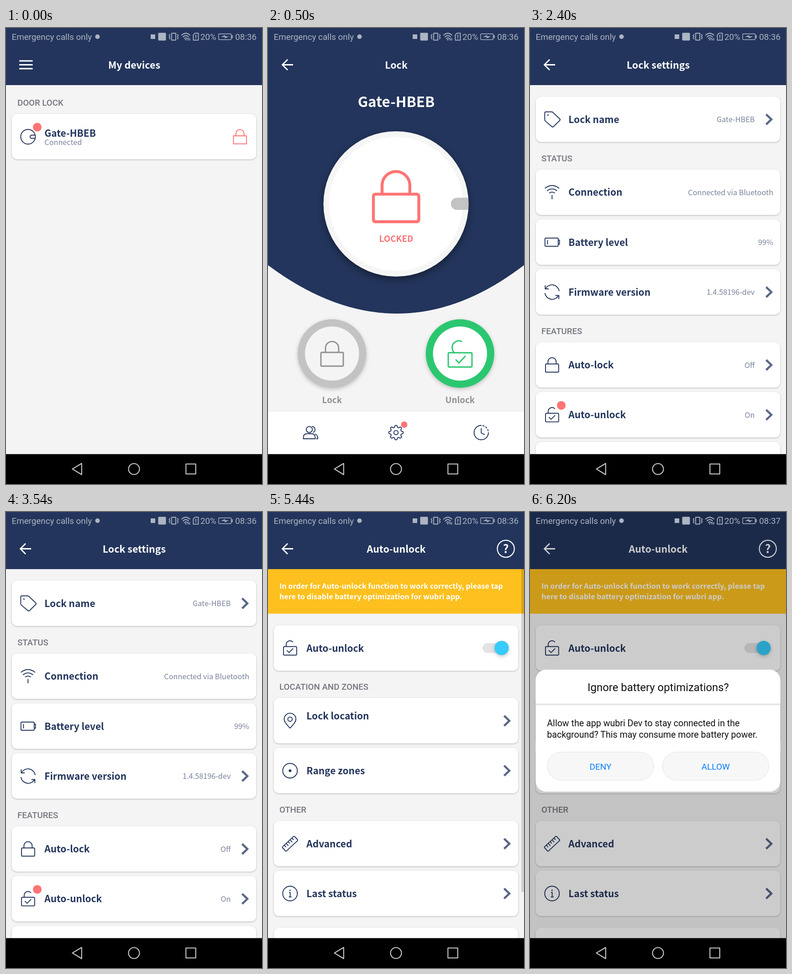
Write an HTML page that moves like this. It is 561 px wide and 998 px high and loops after 8 s.

```html
<!DOCTYPE html>
<html lang="en">
<head>
<meta charset="utf-8">
<title>Lock settings walkthrough</title>
<style>
  html, body { margin: 0; width: 100%; height: 100%; overflow: hidden; background: #f4f4f4; }
  svg { display: block; width: 100vw; height: 100vh; }
  text { font-family: "Noto Sans CJK SC", "Noto Sans CJK JP", "Noto Sans", sans-serif; font-weight: 700; fill: #23355c; }
  .rb { font-family: Roboto, sans-serif; font-weight: 400; }
  .title { font-size: 21.4px; fill: #fff; }
  .item { font-size: 20.9px; }
  .value { font-size: 16.25px; font-weight: 400; fill: #7a839d; }
  .section { font-size: 18.7px; font-weight: 500; fill: #757780; }
  .banner { font-size: 16.15px; fill: #fff; }
  .caption { font-size: 18.7px; fill: #919191; }
  .status { font-size: 18.8px; fill: #adb4c2; }
  .line { fill: none; stroke: #23355c; stroke-width: 1.9; stroke-linecap: round; stroke-linejoin: round; }
  .card { fill: #fff; filter: drop-shadow(0 1.3px 1.6px rgba(0,0,0,.27)); }
  .lift { filter: drop-shadow(0 3px 4px rgba(0,0,0,.22)); }
  .lift-big { filter: drop-shadow(0 6px 8px rgba(0,0,0,.4)); }

  .show { visibility: hidden; animation: 8s step-end infinite; }
  #devices { animation-name: devices; }
  #lock { animation-name: lock; }
  #settings { animation-name: settings; }
  #unlock { animation-name: unlock; }
  #scroll { animation-name: scroll; }
  #dialog, #late { animation-name: dialog; }
  #early { animation-name: early; }
  @keyframes devices { 0% { visibility: visible } 6.25%, 100% { visibility: hidden } }
  @keyframes lock { 0% { visibility: hidden } 6.25% { visibility: visible } 30%, 100% { visibility: hidden } }
  @keyframes settings { 0% { visibility: hidden } 30% { visibility: visible } 53.75%, 100% { visibility: hidden } }
  @keyframes unlock { 0% { visibility: hidden } 53.75%, 100% { visibility: visible } }
  @keyframes scroll { 0% { visibility: hidden } 53.75% { visibility: visible } 77.5%, 100% { visibility: hidden } }
  @keyframes dialog { 0% { visibility: hidden } 77.5%, 100% { visibility: visible } }
  @keyframes early { 0% { visibility: visible } 77.5%, 100% { visibility: hidden } }
</style>
</head>
<body>
<svg id="stage" viewBox="0 0 561 998" preserveAspectRatio="none"></svg>
<script>
const NAVY = '#23355c', RED = '#ff7474', GREEN = '#2bc770', GREY = '#c3c3c3';
const DEVICE = 'Gate-HBEB', APP = 'wubri';

const text = (x, y, cls, str, attrs = '') => `<text x="${x}" y="${y}" class="${cls}" ${attrs}>${str}</text>`;
const mid = 'text-anchor="middle"', end = 'text-anchor="end"';
const rect = (x, y, w, h, fill, r = 0, attrs = '') =>
  `<rect x="${x}" y="${y}" width="${w}" height="${h}" rx="${r}" fill="${fill}" ${attrs}/>`;
const circle = (x, y, r, fill, attrs = '') => `<circle cx="${x}" cy="${y}" r="${r}" fill="${fill}" ${attrs}/>`;
const line = (d, style = '') => `<path class="line" d="${d}" style="${style}"/>`;
const at = (x, y, body) => `<g transform="translate(${x} ${y})">${body}</g>`;
const screen = (id, body) => `<g id="${id}" class="show">${body}</g>`;
const dot = (x, y, r) => circle(x, y, r, RED);
const ring = r => circle(0, 0, r, 'none', 'class="line"');
const box = (x, y, w, h, r) => rect(x, y, w, h, 'none', r, 'class="line"');

// Row icons, drawn around their own centre
const icons = {
  knob: ring(16) + line('M15.6 -3.5 H8 a3.5 3.5 0 0 0 0 7 H15.6'),
  tag: line('M-13.5 -16.5 H-1 q1.5 0 2.6 1 L17 -1 q1.5 1.6 0 3.2 L3 16 q-1.6 1.5 -3.3 0 L-15 3.4 q-1 -1 -1 -2.5 V-14 q0 -2.5 2.5 -2.5 Z') +
    circle(-9, -9.5, 1.5, NAVY),
  wifi: line('M-15 -9 Q0 -20.5 15 -9 M-10.5 -3.5 Q0 -11.5 10.5 -3.5 M-5.5 1.5 Q0 -2.5 5.5 1.5 M0 6.5 V14.5'),
  battery: box(-15.5, -9, 29, 18, 2) + line('M13.5 -4.5 H16.3 V4.5 H13.5 M-10 -4 V4'),
  refresh: line('M-14.5 -7 A16 16 0 0 1 15.5 -3 M14.5 7 A16 16 0 0 1 -15.5 3 M-15 -14 V-7 H-8 M15 14.5 V7.5 H8'),
  lock: box(-14.3, -2.3, 28.8, 18, 2) + line('M-9 -2.3 V-7 a9 9 0 0 1 18 0 V-2.3'),
  unlock: box(-14.3, -3.3, 28.8, 18.8, 2) + line('M-8.5 -3.3 V-7.5 a8.5 8.5 0 0 1 14.5 -6 M-6.5 5.5 l4.3 4.3 L6.3 1.5'),
  pin: line('M0 16 C-7.5 8 -12.8 2.5 -12.8 -3.8 a12.8 12.8 0 0 1 25.6 0 C12.8 2.5 7.5 8 0 16 Z') +
    circle(0, -3.6, 4.8, 'none', 'class="line"'),
  target: ring(16) + circle(0, 0, 3, NAVY),
  ruler: `<g transform="rotate(-43)">${box(-18, -6.3, 36, 12.6, 1.5)}${line('M-11.5 -6 v4.5 M-5.8 -6 v6 M0 -6 v4.5 M5.8 -6 v6 M11.5 -6 v4.5')}</g>`,
  info: ring(16) + line('M-1.5 -2.5 H0.3 V7.5 M-2 7.5 H2.6') + circle(0, -7, 1.5, NAVY)
};

const card = y => rect(12.5, y, 536, 99.6, '#fff', 12, 'class="card"');
const chevron = y => `<path d="M517.5 ${y - 11} L529 ${y} L517.5 ${y + 11}" fill="none" stroke="#5a6785" stroke-width="4.5"/>`;
const section = (y, str) => text(25, y, 'section rb', str);

function row(y, icon, name, { value, arrow, nameY = 57.8, iconY = 50 } = {}) {
  return card(y) + at(48.3, y + iconY, icons[icon]) + text(84.3, y + nameY, 'item', name) +
    (value ? text(arrow ? 492.5 : 533, y + 56, 'value', value, end) : '') +
    (arrow ? chevron(y + 50) : '');
}

const white = 'stroke:#fff;stroke-width:2.8;stroke-linecap:butt;stroke-linejoin:miter';
const back = line('M55 80.5 H32 M43 69 L31.5 80.5 L43 92', white);
const header = (title, left) => rect(0, 0, 561, 125, NAVY) + left + text(281, 89.2, 'title', title, mid);

const devices = header('My devices', line('M29 72 H58.5 M29 80.5 H58.5 M29 89 H58.5', white)) +
  section(170, 'DOOR LOCK') +
  row(188, 'knob', DEVICE, { nameY: 49.8 }) + text(84.3, 256, 'value', 'Connected') + dot(68.5, 217, 9.5) +
  line('M498.5 236 H527 V253.5 H498.5 Z M503.8 236 V231 a8.9 8.9 0 0 1 17.8 0 V236', `stroke:${RED}`);

function gear() {
  let d = '';
  for (let i = 0; i < 160; i++) {
    const a = i / 160 * Math.PI * 2, r = 13.8 + 2 * Math.tanh(2.2 * Math.cos(8 * a));
    d += `${i ? 'L' : 'M'}${(r * Math.cos(a)).toFixed(2)} ${(r * Math.sin(a)).toFixed(2)}`;
  }
  return line(d + 'Z') + ring(4.6);
}
const people = circle(-2.5, -6.7, 6.7, 'none', 'class="line"') +
  line('M-15.5 13.5 V11 q0 -8.5 8 -8.5 H2.5 q8 0 8 8.5 V13.5 Z M4 -13.3 a6.7 6.7 0 0 1 2.5 12.6 M11 3.5 q5 2.2 5 8 V13.5 H13.5');
const clock = line('M0 -15.7 A15.7 15.7 0 1 0 15.7 0 M0 -9 V1 L7 4.2') +
  line('M3.5 -15.3 A15.7 15.7 0 0 1 15.5 -2.5', 'stroke-dasharray:3 4');

const pad = (x, color, inner, label) =>
  circle(x, 712.5, 75, color, 'class="lift"') + circle(x, 712.5, 59.3, inner) + text(x, 821, 'caption', label, mid);

const lock = header('Lock', '') +
  `<path d="M0 0 H561 V519 Q284 731 0 519 Z" fill="${NAVY}"/>` + back +
  text(281, 89.2, 'title', 'Lock', mid) +
  text(281, 172.5, 'title', DEVICE, mid + ' style="font-size:31.3px"') +
  circle(280.5, 385, 159, '#f6f6f6', 'class="lift-big"') + circle(280.5, 385, 146.5, '#fff') +
  `<path d="M439.2 371.5 H414 a13.2 13.2 0 0 0 0 26.5 H439.2 Z" fill="${GREY}"/>` +
  line('M236 363.6 H325.5 q5 0 5 5 V419 q0 5 -5 5 H236 q-5 0 -5 -5 V368.6 q0 -5 5 -5 Z M250 363 V344.5 a30.4 30.4 0 0 1 60.8 0 V363', `stroke:${RED};stroke-width:6.4`) +
  text(281, 468, 'caption', 'LOCKED', mid + ` style="fill:${RED};font-size:18.8px"`) +
  pad(140.3, GREY, '#f4f4f4', 'Lock') + pad(420.8, GREEN, '#fff', 'Unlock') +
  line('M118 710 H163 q2 0 2 2 V738 q0 2 -2 2 H118 q-2 0 -2 -2 V712 q0 -2 2 -2 Z M126 710 V700.5 a14.4 14.4 0 0 1 28.8 0 V710', 'stroke:#919191;stroke-width:2.9') +
  line('M397 710.8 H445 q2 0 2 2 V740 q0 2 -2 2 H397 q-2 0 -2 -2 V712.8 q0 -2 2 -2 Z M407.5 710 Q403.5 705 403.5 699.5 A14.5 14.5 0 0 1 424 686 M412 726.5 L418.5 733 L432 718.5', `stroke:${GREEN};stroke-width:2.9`) +
  rect(0, 838, 561, 95, '#fff') + rect(0, 838, 561, 1, '#e9e9e9') +
  at(93, 885.5, people) + at(280.5, 885.5, gear()) + at(467.3, 885.5, clock) + dot(298.5, 868, 7);

const settings = header('Lock settings', back) +
  row(150, 'tag', 'Lock name', { value: DEVICE, arrow: true }) +
  section(292, 'STATUS') +
  row(309.6, 'wifi', 'Connection', { value: 'Connected via Bluetooth' }) +
  row(418.8, 'battery', 'Battery level', { value: '99%' }) +
  row(528, 'refresh', 'Firmware version', { value: '1.4.58196-dev', arrow: true }) +
  section(669.7, 'FEATURES') +
  row(687.5, 'lock', 'Auto-lock', { value: 'Off', arrow: true }) +
  row(796.6, 'unlock', 'Auto-unlock', { value: 'On', arrow: true }) + dot(68.5, 826, 9.5) +
  card(906);

const unlock = header('Auto-unlock', back) +
  circle(521.2, 80.5, 18.6, 'none', 'stroke="#fff" stroke-width="2.2"') +
  text(521.2, 90, 'title', '?', mid + ' style="font-size:25px"') +
  rect(0, 125, 561, 97.5, '#fdc01e') +
  text(25, 168, 'banner', 'In order for Auto-unlock function to work correctly, please tap') +
  text(25, 191.4, 'banner', `here to disable battery optimization for ${APP} app.`) +
  row(247.8, 'unlock', 'Auto-unlock') +
  rect(470, 287, 46, 21.5, '#e3e3e3', 10.7) + circle(512, 297.6, 15.6, '#36cbfa', 'class="lift"') +
  section(389.3, 'LOCATION AND ZONES') +
  row(407, 'pin', 'Lock location', { arrow: true, nameY: 46.8 }) +
  row(516.2, 'target', 'Range zones', { arrow: true }) +
  section(658, 'OTHER') +
  row(676, 'ruler', 'Advanced', { arrow: true }) +
  row(785, 'info', 'Last status', { arrow: true }) +
  card(910);

const button = (x, label) =>
  rect(x, 525.5, 233, 61.5, '#f7f7f7', 30.7, 'stroke="#e2e2e2" stroke-width="1"') +
  text(x + 116.5, 563.5, 'rb', label, mid + ' style="font-size:19px;fill:#0a7fff"');

const dialog = rect(0, 0, 561, 998, '#000', 0, 'opacity=".2"') +
  rect(12.5, 345, 536, 267, '#fff', 23) + rect(12.5, 419.5, 536, 3, '#e2e2e2') +
  text(281, 391.5, 'rb', 'Ignore battery optimizations?', mid + ' style="font-size:23.9px;fill:#111"') +
  ['Allow the app ' + APP + ' Dev to stay connected in the', 'background? This may consume more battery power.']
    .map((s, i) => text(37.3, 469 + i * 25.3, 'rb', s, 'style="font-size:19.65px;fill:#111"')).join('') +
  button(38, 'DENY') + button(290.3, 'ALLOW');

const INK = '#adb4c2';
const thin = `stroke:${INK};stroke-width:1.8`;
const status = text(12.5, 26, 'status rb', 'Emergency calls only') +
  circle(200.5, 19, 5, INK) + rect(317, 14, 10, 10, INK) + rect(333.5, 10.5, 17, 17, INK, 2) +
  line('M363 11.5 H372 V26.5 H363 Z M359.5 14 l-2 2.5 2 2.5 -2 2.5 2 2.5 M375.5 14 l2 2.5 -2 2.5 2 2.5 -2 2.5', thin) +
  line('M385 15.5 Q394 7.5 403 15.5 M388 19.5 Q394 13.5 400 19.5 M391 23 Q394 20 397 23', thin) +
  circle(394, 25.5, 1.6, INK) + line('M399 23 v3.5 M402.5 23 v3.5', thin) +
  line('M414 11.3 H421.5 V26.6 H410.5 V15 Z M416 15.5 V20.5 M416 23.3 v.2', thin) +
  text(426, 26, 'status rb', '20%') +
  rect(466, 12.7, 27.5, 12.8, 'none', 2, `stroke="${INK}" stroke-width="1.4"`) + rect(494.5, 15.5, 2.2, 7, INK) +
  `<path d="M471 19.5 L480 15.5 V18.3 H488.5 L479.5 22.7 V19.8 Z" fill="${INK}"/>` +
  screen('early', text(502.3, 26, 'status rb', '08:36')) + screen('late', text(502.3, 26, 'status rb', '08:37'));

const nav = rect(0, 932.6, 561, 66, '#000') +
  line('M145.5 965.2 L165.8 953 V977.5 Z M394.3 954.3 H415.8 V976 H394.3 Z', 'stroke:#c9c9c9;stroke-width:2.1') +
  circle(280.5, 965.2, 12, 'none', 'stroke="#c9c9c9" stroke-width="2.1"');

document.getElementById('stage').innerHTML =
  rect(0, 0, 561, 998, '#f4f4f4') +
  screen('devices', devices) + screen('lock', lock) + screen('settings', settings) + screen('unlock', unlock) +
  screen('scroll', rect(555, 125, 6, 707, '#000', 0, 'opacity=".15"')) +
  screen('dialog', dialog) + status + nav;
</script>
</body>
</html>
```
